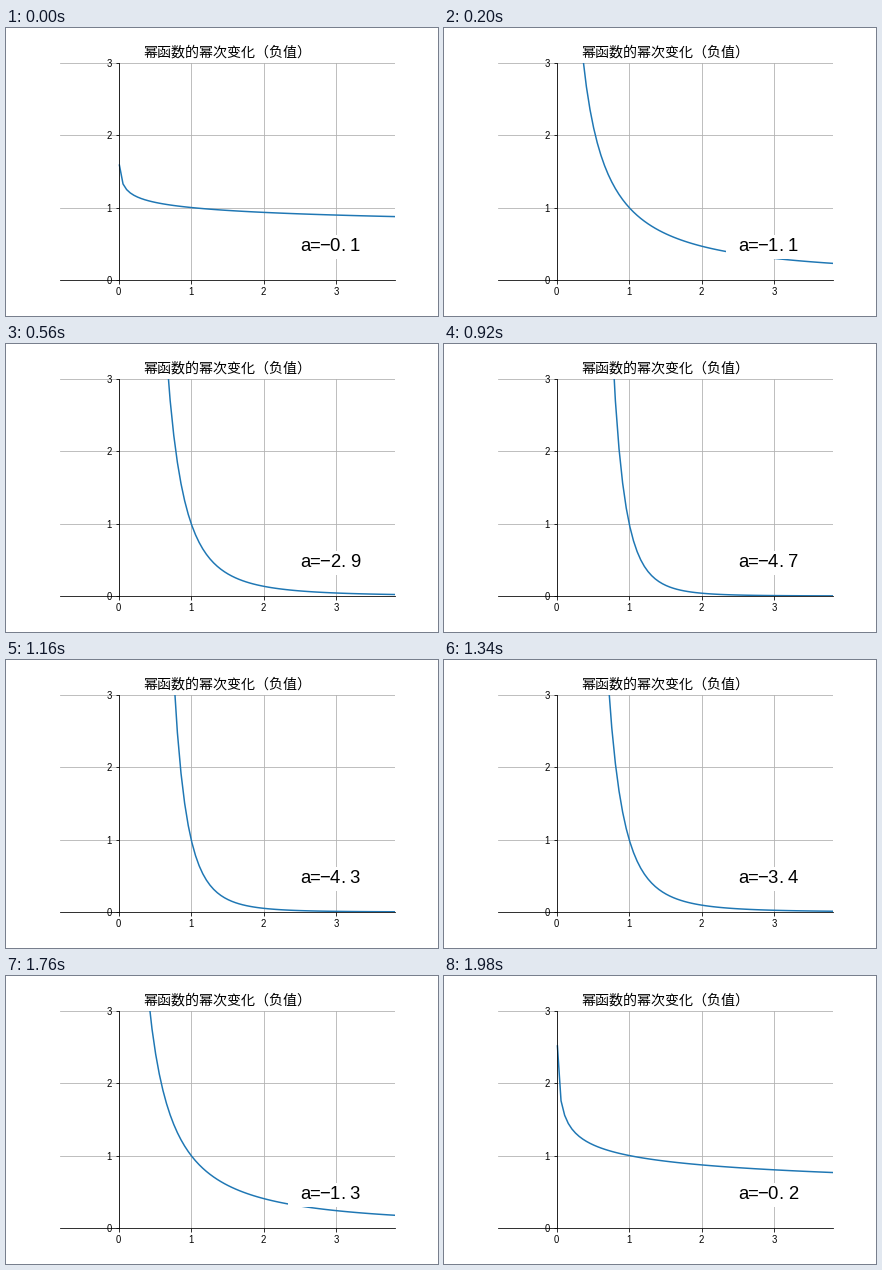
These frames come from a looping animation (432 px wide and 288 px high, 2000 ms). A matplotlib script:

```python
import numpy as np
import matplotlib.pyplot as plt
from matplotlib.animation import FuncAnimation
from matplotlib.patches import Rectangle

FRAMES = 100
INTERVAL = 20
CJK = "Noto Sans CJK JP"
LATIN = "Liberation Sans"

fig = plt.figure(figsize=(6, 4), dpi=72, facecolor="white")
fig.subplots_adjust(left=0.125, right=0.9, bottom=0.125, top=0.88)
ax = fig.add_subplot()

# Equal units on both axes, x range centred on 1.5
unit = 288 * (0.88 - 0.125) / 3
half = 432 * (0.9 - 0.125) / unit / 2
ax.set_xlim(1.5 - half, 1.5 + half)
ax.set_ylim(0, 3)
ax.set_xticks(range(4))
ax.set_yticks(range(4))
ax.grid(color="#b0b0b0", linewidth=0.8)
ax.set_title("幂函数的幂次变化（负值）", fontname=CJK, fontsize=14)

for side in ("top", "right"):
    ax.spines[side].set_visible(False)
for side in ("left", "bottom"):
    ax.spines[side].set_position(("data", 0))
for label in ax.get_xticklabels() + ax.get_yticklabels():
    label.set_fontname(LATIN)
    label.set_fontsize(9.5)

x = np.arange(0.01, 5, 0.05)
curve, = ax.plot(x, x ** -0.1, color="#1f77b4", linewidth=1.5)

# White plate behind the exponent readout
PITCH = 10 / unit
LEFT, BASE = 2.5, 0.4
ax.add_patch(Rectangle((LEFT - 12 / unit, BASE - 8 / unit),
                       84 / unit, 24 / unit,
                       facecolor="white", edgecolor="none", zorder=3))


def cell(k):
    """One fixed-pitch character slot of the readout."""
    dot = k == 4
    return ax.text(LEFT + (k if dot else k + 0.5) * PITCH, BASE, "",
                   ha="left" if dot else "center", va="baseline",
                   fontname=LATIN, fontsize=18.5, zorder=4)


cells = [cell(k) for k in range(6)]


def update(i):
    tenths = 51 - abs(i - 50)
    a = -tenths / 10
    curve.set_ydata(x ** a)
    for slot, char in zip(cells, f"a=\u2212{-a:.1f}"):
        slot.set_text(char)
    return [curve, *cells]


anim = FuncAnimation(fig, update, frames=FRAMES, interval=INTERVAL,
                     repeat=True, repeat_delay=0, blit=False)
plt.show()
```
